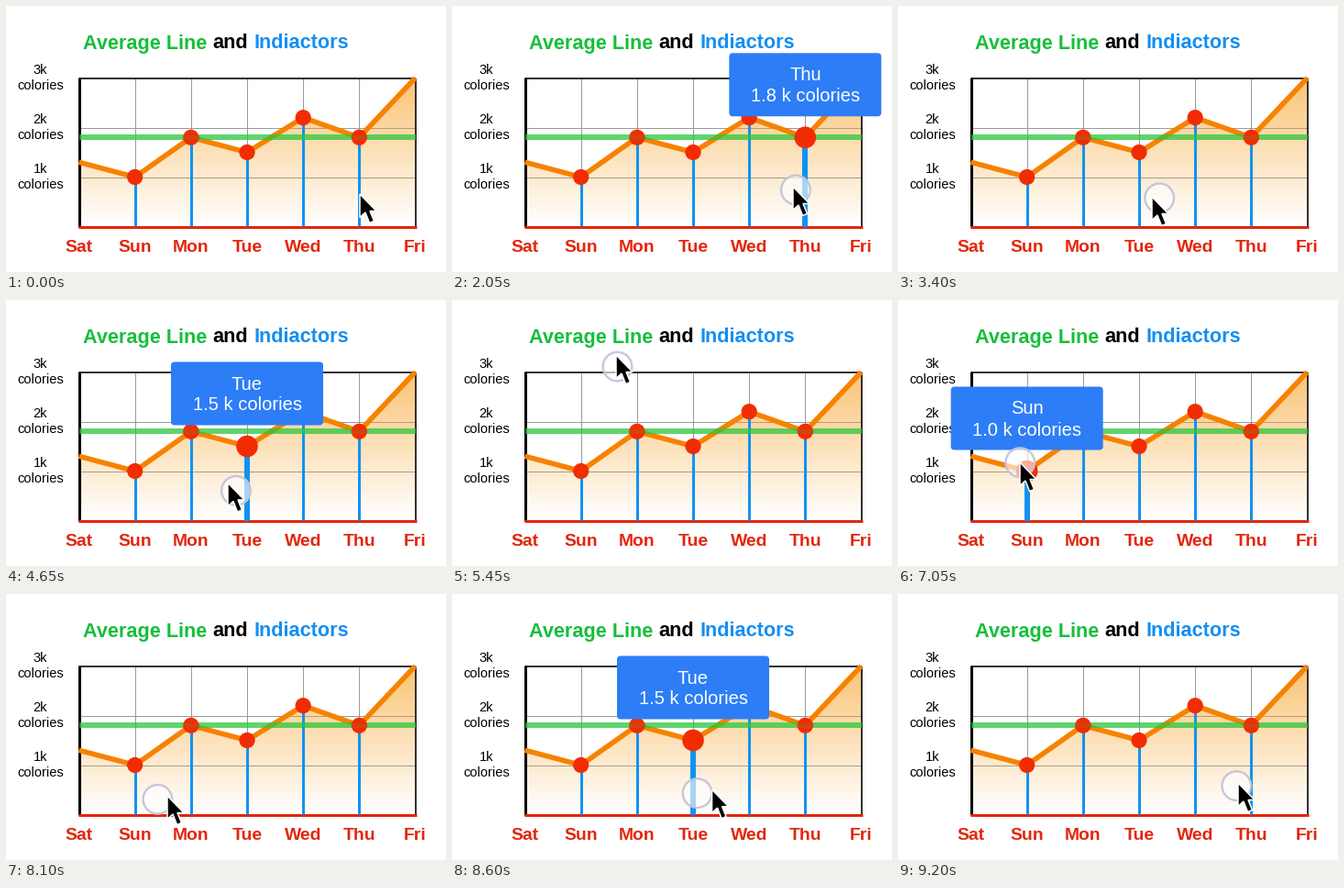
Animation, 480 px wide and 290 px high, one loop 9250 ms. Source, as a matplotlib script:

```python
import numpy as np
import matplotlib.pyplot as plt
from matplotlib.animation import FuncAnimation
from matplotlib.patches import Circle, FancyBboxPatch, Polygon

W, H, DPI = 480, 290, 100
STEP, LOOP = 50, 9250
PX = 72 / DPI
LEFT, RIGHT, TOP, BOTTOM = 79.5, 446.5, 78.5, 240.5
RED, DOT, BLUE, ORANGE = "#e3260c", "#f12c02", "#1292f0", "#f68200"

DAYS = ["Sat", "Sun", "Mon", "Tue", "Wed", "Thu", "Fri"]
VALUES = np.array([1.3, 1.0, 1.8, 1.5, 2.2, 1.8, 3.0])
AVERAGE = 1.8
XS = np.linspace(LEFT, RIGHT, 7)
YS = BOTTOM - 54 * VALUES
AVG_Y = BOTTOM - 54 * AVERAGE

# pointer path: time (ms), x, y
PATH = np.array([
    (0, 386, 205), (50, 386, 205), (200, 386, 200), (1200, 386, 200),
    (1300, 385, 201), (1600, 385, 201), (2050, 372, 197), (2500, 325, 195),
    (2800, 322, 196), (3100, 321, 197), (3400, 277, 208), (3700, 262, 210),
    (4150, 260, 210), (4450, 260, 210), (4900, 206, 170), (5200, 184, 110),
    (5450, 179, 60), (5650, 170, 46), (6000, 148, 80), (6300, 141, 125),
    (6700, 136, 160), (7050, 133, 177), (7300, 137, 187), (7900, 150, 222),
    (8100, 176, 220), (8400, 236, 216), (8750, 318, 211), (9000, 364, 207),
    (9200, 371, 206), (9250, 372, 206),
], float)
PRESS_START, PRESS_END = 50, 200
LONG_PRESS = 650
LAG, REACH = 65, 14


def slopes(t, v):
    """Monotone slopes, so the pointer never overshoots a stop."""
    d = np.diff(v) / np.diff(t)
    m = np.zeros(len(v))
    for i in range(1, len(v) - 1):
        if d[i - 1] * d[i] > 0:
            m[i] = 2 * d[i - 1] * d[i] / (d[i - 1] + d[i])
    m[-1] = d[-1]
    return m


T = PATH[:, 0]
POS = PATH[:, 1:]
SLOPES = np.column_stack([slopes(T, POS[:, k]) for k in (0, 1)])


def pointer(t):
    t = min(max(t, 0), T[-1])
    i = min(np.searchsorted(T, t, side="right") - 1, len(T) - 2)
    h = T[i + 1] - T[i]
    s = (t - T[i]) / h
    return ((2 * s**3 - 3 * s**2 + 1) * POS[i] + (s**3 - 2 * s**2 + s) * h * SLOPES[i]
            + (3 * s**2 - 2 * s**3) * POS[i + 1] + (s**3 - s**2) * h * SLOPES[i + 1])


fig = plt.figure(figsize=(W / DPI, H / DPI), dpi=DPI, facecolor="white")
ax = fig.add_axes([0, 0, 1, 1])
ax.axis("off")


def line(x, y, color, width, z, **kw):
    return ax.plot(x, y, color=color, lw=width * PX, zorder=z,
                   solid_capstyle="butt", solid_joinstyle="round", **kw)[0]


def text(x, y, s, size, color, z=8, ha="center", weight="normal"):
    return ax.text(x, y, s, fontsize=size * PX, color=color, ha=ha, va="baseline",
                   family="Liberation Sans", weight=weight, zorder=z)


# title and labels
for x, word, color in [(83.5, "Average Line", "#17bf3b"), (225.5, "and", "black"),
                       (270, "Indiactors", "#148ff2")]:
    text(x, 46.5, word, 21.6, color, ha="left", weight="bold")
for x, day in zip(XS, DAYS):
    text(x, 267.5, day, 19.4, RED, weight="bold")
for k in (1, 2, 3):
    y = BOTTOM - 54 * k
    text(37.5, y - 4, f"{k}k", 14.6, "black")
    text(37.5, y + 12.8, "colories", 14.6, "black")

# grid and border
for x in XS[1:-1]:
    line([x, x], [TOP, BOTTOM], "#9a9a9a", 1, 1)
for k in (1, 2):
    line([LEFT, RIGHT], [BOTTOM - 54 * k] * 2, "#9a9a9a", 1, 1)
line([LEFT, RIGHT], [TOP, TOP], "black", 1.6, 2)
line([RIGHT, RIGHT], [TOP, BOTTOM], "black", 1.6, 2)
line([LEFT, LEFT], [TOP - 1, BOTTOM], "black", 3, 2)
line([LEFT - 1, RIGHT + 1], [BOTTOM, BOTTOM], RED, 3, 2.5)

# shaded area under the curve
shade = np.ones((160, 1, 4))
shade[..., :3] = (0.97, 0.62, 0.12)
shade[..., 3] = np.linspace(0.62, 0, 160)[:, None]
fill = ax.imshow(shade, extent=(LEFT, RIGHT, BOTTOM, TOP), aspect="auto",
                 interpolation="bilinear", zorder=1.5)
area = Polygon(np.vstack([np.column_stack([XS, YS]), (RIGHT, BOTTOM), (LEFT, BOTTOM)]),
               transform=ax.transData)
fill.set_clip_path(area)

# curve, spots and average line
line(XS, YS, ORANGE, 5.6, 3)
line([LEFT, RIGHT], [AVG_Y, AVG_Y], "#28c63a", 6, 4, alpha=0.74)
for x, y in zip(XS[1:-1], YS[1:-1]):
    line([x, x], [y, BOTTOM - 1], BLUE, 3, 3.5)
    ax.add_patch(Circle((x, y), 8.6, color=DOT, lw=0, zorder=5))
    if abs(y - AVG_Y) < 1:
        line([x - 8, x + 8], [y, y], "#cf450b", 5, 5.1)

# highlighted spot with its tooltip
mark = line([0, 0], [0, 0], BLUE, 6, 6)
spot = ax.add_patch(Circle((0, 0), 11.8, color=DOT, lw=0, zorder=6.1))
tip = ax.add_patch(FancyBboxPatch((0, 0), 158, 61, boxstyle="round,pad=4,rounding_size=4",
                                  color="#2d7df7", lw=0, zorder=9))
tip_day = text(0, 0, "", 20.2, "white", z=10)
tip_value = text(0, 0, "", 20.2, "white", z=10)
touch_parts = [mark, spot, tip, tip_day, tip_value]

# pointer
ring = ax.add_patch(Circle((0, 0), 15.8, facecolor=(1, 1, 1, 0.62),
                           edgecolor=(0.77, 0.77, 0.85, 0.95), lw=2.4 * PX, zorder=11))
ARROW = np.array([(0, 0), (0, 25.5), (6, 20), (10.5, 31.5), (15.5, 29.5),
                  (11, 18.5), (18, 18.5)])
arrow = ax.add_patch(Polygon(ARROW, facecolor="black", edgecolor="white",
                             lw=1.5 * PX, joinstyle="miter", zorder=12))

ax.set_xlim(0, W)
ax.set_ylim(H, 0)


def touched(t, x, y):
    if t < LONG_PRESS or y < TOP:
        return None
    i = int(np.argmin(abs(XS - x)))
    return i if abs(XS[i] - x) < REACH else None


def draw(n):
    t = n * STEP
    arrow.set_xy(ARROW + pointer(t))
    cx, cy = pointer(t - LAG) + (0, 3)
    press = np.clip((t - PRESS_START + STEP) / (PRESS_END - PRESS_START + STEP), 0, 1)
    press = press if t >= PRESS_START else 0
    ring.center = cx, cy
    ring.set_facecolor((1, 1, 1, 0.62 * press))
    ring.set_edgecolor((0.77, 0.77, 0.85, 0.95 * press))

    i = touched(t, cx, cy)
    for part in touch_parts:
        part.set_visible(i is not None)
    if i is not None:
        x, y = XS[i], YS[i]
        mark.set_data([x, x], [y, BOTTOM])
        spot.center = x, y
        tip.set_x(x - 79)
        tip.set_y(y - 88)
        tip_day.set_text(DAYS[i])
        tip_day.set_position((x, y - 62))
        tip_value.set_text(f"{VALUES[i]:.1f} k colories")
        tip_value.set_position((x, y - 39))
    return [arrow, ring, *touch_parts]


anim = FuncAnimation(fig, draw, frames=LOOP // STEP, interval=STEP,
                     repeat=True, repeat_delay=0, blit=False)
plt.show()
```
